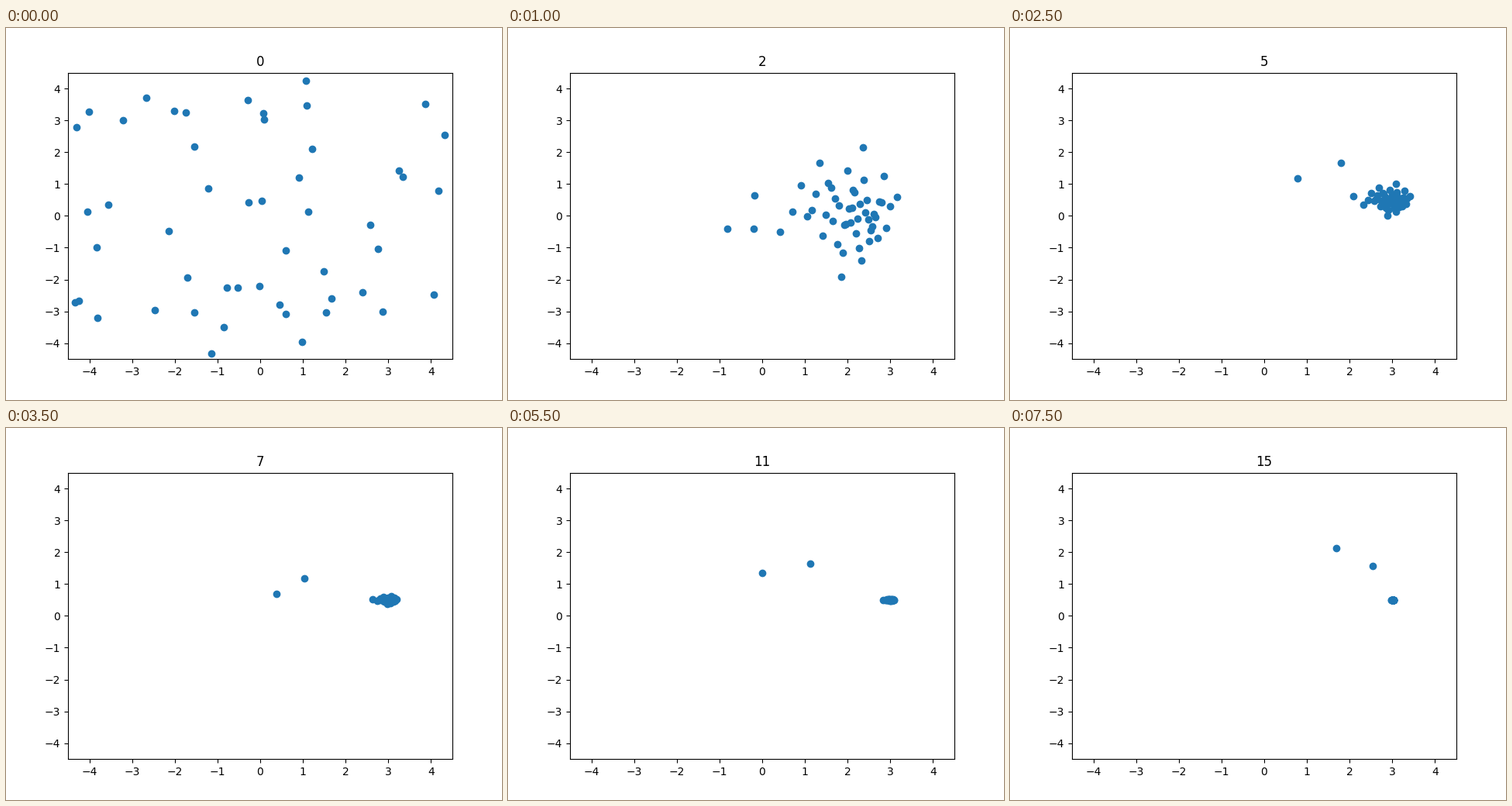
These frames come from a looping animation (640x480 px, 8000 ms). A matplotlib script:

```python
import numpy as np
import matplotlib.pyplot as plt
from matplotlib.animation import FuncAnimation

FRAMES, INTERVAL = 16, 500
COUNT = 48  # swarm members, plus two stragglers

rng = np.random.default_rng(7)
home = rng.uniform(-4.35, 4.35, (COUNT, 2))

# Each member keeps its rank within the cloud: x trails off to the left,
# y is symmetric. Both are scaled to unit deviation.
rank = (home.argsort(axis=0).argsort(axis=0) + 0.5) / COUNT
offset = np.column_stack([
    (np.log(-np.log(1 - rank[:, 0])) + 0.577) / 1.283,
    np.log(rank[:, 1] / (1 - rank[:, 1])) / 1.814,
])

# The cloud's centre and spread as it closes in on (3, 0.5).
STEPS = [1, 3, 5, 7, 11, 15]
CENTRE = np.array([[1.35, -0.1], [2.65, 0.35], [2.95, 0.5],
                   [3, 0.5], [3, 0.5], [3.01, 0.5]])
SPREAD = np.array([[1.1, 1.45], [0.45, 0.45], [0.28, 0.2],
                   [0.12, 0.05], [0.055, 0.01], [0.012, 0.003]])

# Waypoints of the stragglers, which never settle.
STRAY_STEPS = [0, 1, 2, 3, 5, 7, 11, 15]
STRAYS = [
    np.array([[-4.34, -2.72], [-3.5, -1.82], [-0.82, -0.4], [0.42, 0.28],
              [0.78, 1.18], [0.38, 0.69], [0, 1.35], [1.69, 2.13]]),
    np.array([[-3.81, -3.2], [-2.14, -2.3], [-0.2, -0.4], [0.8, 0.66],
              [1.8, 1.66], [1.03, 1.18], [1.13, 1.64], [2.54, 1.56]]),
]


def along(step, steps, points):
    """Point at the given step on a path through the waypoints."""
    return np.array([np.interp(step, steps, axis) for axis in points.T])


def positions(step):
    if step == 0:
        cloud = home
    else:
        spread = np.exp(along(step, STEPS, np.log(SPREAD)))
        cloud = along(step, STEPS, CENTRE) + spread * offset
    return np.vstack([cloud, *(along(step, STRAY_STEPS, s) for s in STRAYS)])


fig, ax = plt.subplots(figsize=(6.4, 4.8), dpi=100)
ax.set_xlim(-4.5, 4.5)
ax.set_ylim(-4.5, 4.5)
dots = ax.scatter(*positions(0).T, color="#1f77b4")
title = ax.set_title("0")


def update(step):
    dots.set_offsets(positions(step))
    title.set_text(str(step))
    return dots, title


anim = FuncAnimation(fig, update, frames=FRAMES, interval=INTERVAL,
                     repeat=True, repeat_delay=0)
plt.show()
```
